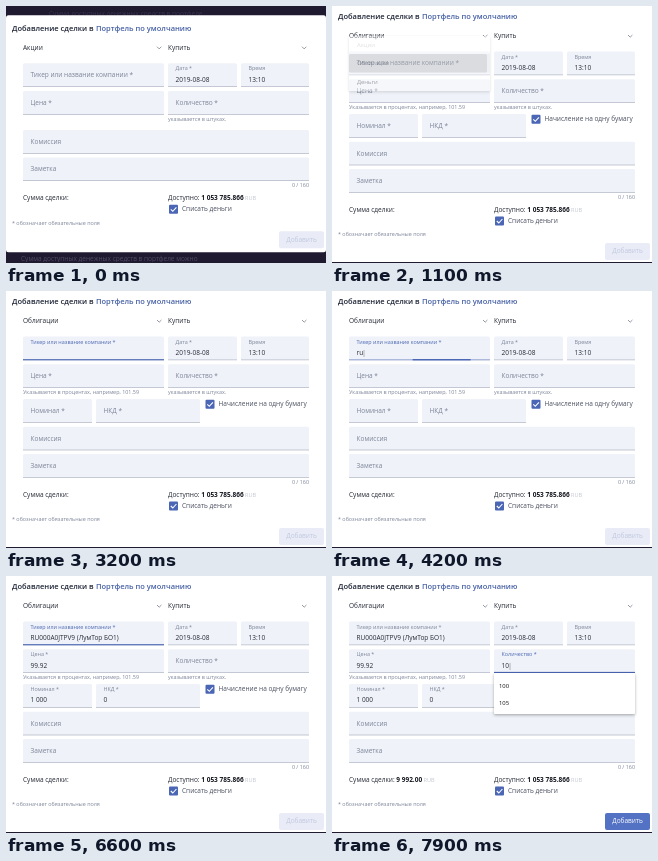
These frames come from a looping animation (320x257 px, 8000 ms). An HTML page:

```html
<!DOCTYPE html>
<html lang="ru">
<head>
<meta charset="utf-8">
<style>
  html, body { margin: 0; width: 100%; height: 100%; overflow: hidden; background: #1f1a30; }
  svg { display: block; width: 100vw; height: 100vh; font-family: "Open Sans", "Noto Sans", sans-serif; }
  text { white-space: pre; }
</style>
</head>
<body>
<svg id="stage" viewBox="0 0 320 257"></svg>
<script>
const LOOP = 8000, STEP = 100;
const BLUE = '#4a66b4', INK = '#262a36', GREY = '#7c8499', PALE = '#c3c7d1', FILL = '#eff2f8', LINE = '#a3aabb';
const BODY = 6.5, SMALL = 5.4, ITEM = 5.9;
const stage = document.getElementById('stage');

const BONDS = [
  'RU000A0JTPV9 (ЛумТор БО1), 99.92%',
  'SU71302RMFS3 (ОКД 71302), 100.44%',
  'RU000A0JR860 (Вельмартент), 99.94%',
  'RU000A0JT6B2 (КЮД.ЛС 24), 103.02%',
  'RU000A0JV110 (ДКМТорФБ3), 100.00%',
  'RU000A0JQ5C5 (ЖЛД 02), 0.00%',
  'RU000A0JS7P1 (ТарнОкр358), 100.00%',
  'RU000A0JTX41 (ЛУВО БО 04), 100.00%'
];

const ramp = (t, from, to) => Math.min(1, Math.max(0, (t - from) / (to - from)));
const mix = (a, b, p) => a + (b - a) * p;

const rect = (x, y, w, h, fill, extra = '') =>
  `<rect x="${x}" y="${y}" width="${w}" height="${h}" fill="${fill}" ${extra}/>`;

// y is the middle of the lowercase letters
const text = (x, y, str, size = BODY, fill = INK, extra = '') =>
  `<text x="${x}" y="${y + size * 0.33}" font-size="${size}" fill="${fill}" ${extra}>${str}</text>`;

const span = (str, size, fill, weight = 400) =>
  `<tspan font-size="${size}" fill="${fill}" font-weight="${weight}">${str}</tspan>`;

function field(x, y, w, label, { value = '', float = value ? 1 : 0, focus = 0, caret = false, loading = false } = {}) {
  const labelY = y + mix(11.7, 5.4, float);
  let out = `<path d="M${x} ${y + 23.5}v-22q0-1.5 1.5-1.5h${w - 3}q1.5 0 1.5 1.5v22z" fill="${FILL}"/>`
    + rect(x, y + 23, w, 0.6, LINE)
    + text(x + 7.5, labelY, label, mix(BODY, SMALL, float), focus ? BLUE : GREY);
  if (focus) {
    const half = w / 2 * focus;
    out += rect(x + w / 2 - half, y + 22.6, half * 2, 1.1, loading ? '#a3b2dc' : BLUE);
  }
  if (value || caret) {
    const cursor = caret ? `<tspan fill="#222" font-weight="300" dx="-0.8">|</tspan>` : '';
    out += text(x + 7.5, y + 16.2, value + cursor);
  }
  return out;
}

const select = (x, y, value) => text(x, y, value)
  + `<path d="M${x + 134} ${y - 1}l2.2 2.2 2.2-2.2" fill="none" stroke="#666c7c" stroke-width=".7"/>`;

const checkbox = (x, y, label) => rect(x, y - 4.5, 9, 9, BLUE, 'rx="1"')
  + `<path d="M${x + 1.8} ${y}l2 2 3.6-4" fill="none" stroke="#fff" stroke-width="1.1"/>`
  + text(x + 13, y, label, BODY, '#4b5060');

const panel = (x, y, w, h, opacity, content) =>
  `<clipPath id="panel"><rect x="${x}" y="${y}" width="${w}" height="${h}" rx="1.5"/></clipPath>
  <g opacity="${opacity}">${rect(x, y, w, h, '#fff', 'rx="1.5" filter="url(#shadow)"')}
  <g clip-path="url(#panel)">${content}</g></g>`;

function assetMenu(t) {
  const opacity = ramp(t, 50, 250) * (1 - ramp(t, 950, 1200));
  if (!opacity) return '';
  const press = ramp(t, 760, 920);
  const ripple = press ? rect(17, 48, 141, 18.5, '#eeeeee')
    + `<clipPath id="row"><rect x="17" y="48" width="138" height="18.5" rx="1.5"/></clipPath>
       <circle cx="60" cy="57" r="${press * 112}" fill="#bcbcbc" clip-path="url(#row)"/>` : '';
  const grow = mix(0.8, 1, ramp(t, 50, 250));
  return panel(17, 30, 141, 55 * grow, opacity, ripple
    + text(25, 39, 'Акции', ITEM, '#b5b5b5')
    + text(25, 57.3, 'Облигации', ITEM)
    + text(25, 75.8, 'Деньги', ITEM));
}

function bondMenu(t) {
  const opacity = ramp(t, 4500, 4750) * (1 - ramp(t, 5720, 5920));
  if (!opacity) return '';
  const rows = BONDS.map((name, i) => text(25, 79 + i * 18.3, name, ITEM)).join('');
  const height = 137 * mix(0.8, 1, ramp(t, 4500, 4750));
  return panel(18.5, 70.5, 139.5, height, opacity, rect(18, 70, 141, 17.8, '#efefef') + rows);
}

const historyMenu = t => t < 7800 ? '' : panel(162, 97, 141, 41, 1,
  text(167, 110, '100', ITEM, '#111') + text(167, 126.7, '105', ITEM, '#111'));

function button(y, active) {
  return rect(273, y, 45, 17, active ? '#5472c4' : '#e9ecf6', 'rx="2"')
    + text(295.5, y + 8.3, 'Добавить', BODY, active ? '#fff' : '#c0c8e0', 'text-anchor="middle"');
}

function tickerState(t) {
  const focus = ramp(t, 1840, 2080) * (1 - ramp(t, 6850, 7050));
  const chosen = t >= 5800;
  const value = chosen ? 'RU000A0JTPV9 (ЛумТор БО1)' : t >= 3600 ? 'ru' : t >= 3400 ? 'r' : '';
  const blink = t >= 1900 && t < 3400 && (t - 1900) % 850 < 425;
  return {
    value, focus, float: ramp(t, 1840, 2080),
    caret: blink || (t >= 3400 && t < 5300),
    loading: t >= 3650 && t < 4550
  };
}

function loader(t, y) {
  if (t < 3650 || t >= 4550) return '';
  const left = mix(-41, 158, ramp(t, 3650, 4550));
  const from = Math.max(17, left), to = Math.min(158, left + 58);
  return to > from ? rect(from, y + 22.4, to - from, 1.4, BLUE) : '';
}

function draw(t) {
  const bond = t >= 1000;
  const shift = bond ? 11.7 : 0;
  const up = y => y - shift, down = y => y + shift;
  const filled = ramp(t, 5750, 5950);
  const filledField = value => ({ value: t >= 5800 ? value : '', float: filled });
  const amount = t >= 7900 ? '10' : t >= 7800 ? '1' : '';
  const total = t >= 7900 ? '9 992.00' : t >= 7800 ? '999.20' : '';
  const qtyFocus = ramp(t, 6850, 7080);
  const qtyCaret = t >= 7800 || (t >= 6900 && (t - 6900) % 900 < 450);

  let out = `<defs><filter id="shadow" x="-10%" y="-10%" width="120%" height="125%">
      <feDropShadow dx="0" dy="1.2" stdDeviation="1.5" flood-color="#000" flood-opacity=".32"/></filter></defs>`
    + rect(0, 0, 320, 257, '#1f1a30')
    + text(43, 7.5, 'Сумма доступных денежных средств в портфеле', BODY, '#37314a')
    + text(15, 253, 'Сумма доступных денежных средств в портфеле можно', BODY, '#514b66')
    + rect(0, up(9.3), 320, 236.9 + shift * 2, '#fff', 'rx="2.5"')
    + rect(0, 256, 320, 1, '#1f1a30');

  out += `<text x="6" y="${up(24.6)}" font-size="7.5" font-weight="600" fill="#1d2335">Добавление сделки в</text>`
    + `<text x="90" y="${up(24.9)}" font-size="7.5" font-weight="600" fill="#4660a4">Портфель по умолчанию</text>`
    + select(17, up(41.7), bond ? 'Облигации' : 'Акции')
    + select(162, up(41.7), 'Купить');

  const top = up(57.3), second = up(85);
  out += field(17, top, 141, 'Тикер или название компании *', tickerState(t)) + loader(t, top)
    + field(162, top, 69, 'Дата *', { value: '2019-08-08' })
    + field(235, top, 68, 'Время', { value: '13:10' })
    + field(17, second, 141, 'Цена *', filledField('99.92'))
    + field(162, second, 141, 'Количество *', { value: amount, float: qtyFocus, focus: qtyFocus, caret: qtyCaret })
    + text(162, up(113), 'указывается в штуках.', SMALL, GREY);

  if (bond) {
    out += text(17, 101.2, 'Указывается в процентах, например, 101.59', SMALL, GREY)
      + field(17, 108, 69, 'Номинал *', filledField('1 000'))
      + field(90, 108, 104, 'НКД *', filledField('0'))
      + checkbox(199.5, 113.3, 'Начисление на одну бумагу');
  }

  const sum = total ? ' ' + span(total, BODY, '#15171f', 700) + span(' RUB', 5.6, PALE) : '';
  out += field(17, down(124), 286, 'Комиссия')
    + field(17, down(151.4), 286, 'Заметка')
    + text(303, down(179.3), '0 / 160', SMALL, GREY, 'text-anchor="end"')
    + text(17, down(191.7), 'Сумма сделки:' + sum)
    + text(162, down(191.7), 'Доступно: ' + span('1 053 785.866', BODY, '#15171f', 700) + span(' RUB', 5.6, PALE))
    + checkbox(163, down(203.3), 'Списать деньги')
    + text(6, down(216.8), '* обозначает обязательные поля', SMALL, GREY)
    + button(down(225.2), t >= 7800)
    + assetMenu(t) + bondMenu(t) + historyMenu(t);

  stage.innerHTML = out;
}

let shown = -1;
function tick() {
  const t = Math.floor(performance.now() % LOOP / STEP) * STEP;
  if (t !== shown) draw(shown = t);
  requestAnimationFrame(tick);
}
tick();
</script>
</body>
</html>
```
